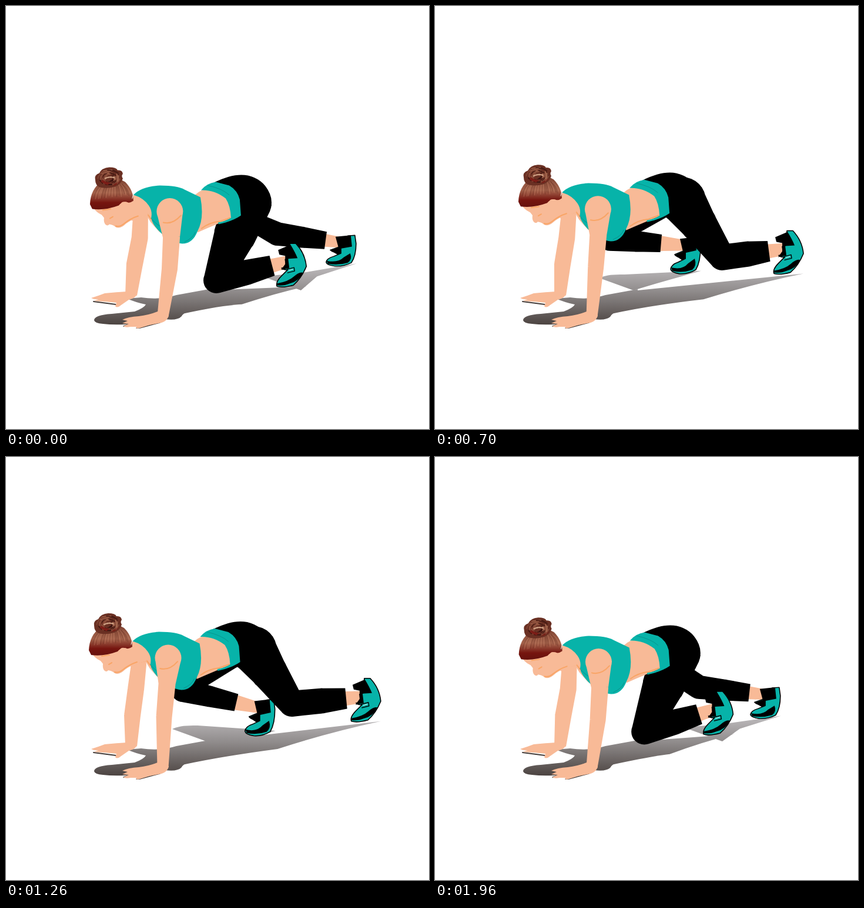
These frames come from a looping animation (720x720 px, 2100 ms). An HTML page:

```html
<!DOCTYPE html>
<html lang="en">
<head>
<meta charset="utf-8">
<title>Mountain climber exercise</title>
<style>
html, body { margin: 0; width: 100%; height: 100%; overflow: hidden; background: #fff; }
svg { display: block; width: 100vw; height: 100vh; }
.skin { fill: #f8ba97; }
.teal { fill: #07b3a9; }
.line { fill: none; stroke-linecap: round; stroke-linejoin: round; }
.warm { stroke: #f9a566; stroke-width: 2; }
.shoe { fill: #07b3a9; stroke: #000; stroke-width: 1.6; stroke-linejoin: round; }
</style>
</head>
<body>
<svg viewBox="0 0 720 720">
  <defs>
    <linearGradient id="ground" gradientUnits="userSpaceOnUse" x1="0" y1="440" x2="0" y2="542">
      <stop offset="0" stop-color="#bfbcbe"/>
      <stop offset=".45" stop-color="#8f8b8b"/>
      <stop offset="1" stop-color="#4c4441"/>
    </linearGradient>
    <linearGradient id="hair" gradientUnits="userSpaceOnUse" x1="0" y1="294" x2="0" y2="348">
      <stop offset="0" stop-color="#7a4030"/>
      <stop offset=".45" stop-color="#a8664e"/>
      <stop offset=".62" stop-color="#8a3a2c"/>
      <stop offset=".76" stop-color="#76150f"/>
      <stop offset="1" stop-color="#64110d"/>
    </linearGradient>
  </defs>

  <g fill="url(#ground)">
    <path d="M150 535Q150 526 180 524L219 520Q235 514 238 508Q222 505 206 498L230 496Q262 501 290 492L345 482V512L322 516Q302 521 299 528Q292 536 270 533L225 540Q190 544 165 541Q151 540 150 535Z"/>
    <path id="shadeFar"/>
    <path id="shadeNear"/>
  </g>

  <path d="M149 503L187 508" class="line" stroke="#443c39" stroke-width="2"/>
  <path id="armFar" class="skin"/>
  <path class="skin" d="M145 497Q158 493 168 489Q188 487 206 486L223 489Q222 497 209 500L196 509Q189 515 186 511L188 505Q170 503 150 502L158 499Q150 500 145 497Z"/>

  <path id="ankleFar" class="skin"/>
  <g id="shoeFar">
    <path class="shoe" d="M432 404L444 403L446 420Q446 445 438 459Q425 467 410 466Q396 464 395 458Q396 450 408 446L420 440Q405 438 402 433L414 428L420 425Z"/>
    <path d="M411 406L437 403L439 426L421 430L421 440L415 443L402 434L416 428Z"/>
    <path d="M396 455Q415 460 425 448L436 440Q440 452 432 459Q415 465 398 461Z"/>
  </g>
  <path id="legFar"/>

  <path id="ankleNear" class="skin"/>
  <g id="shoeNear">
    <path class="shoe" d="M488 405L498 405Q514 422 516 444Q508 464 494 476Q476 481 466 478Q463 471 474 460L484 450Q476 450 474 447L482 446L480 432L486 430Z"/>
    <path d="M468 416L489 407Q497 420 501 430L485 431L487 447L473 450L480 440L480 426L470 424Z"/>
    <path d="M466 473Q485 470 495 461Q505 452 511 455Q502 470 488 473Q476 478 466 476Z"/>
    <path d="M483 449L495 446L496 452L484 455" class="line" stroke="#000" stroke-width="1.4"/>
    <path d="M486 451L493 449" class="line" stroke="#e8f4f3"/>
  </g>
  <path id="legNear"/>

  <g id="trunk">
    <path d="M354 301Q388 284 412 289Q437 295 447 316L452 340L440 362L400 362L390 330Z"/>
    <path class="skin" d="M322 322Q334 310 348 313L378 328L386 361Q360 371 326 386Z"/>
    <path class="line warm" d="M333 379Q346 369 364 367L381 361"/>
    <path class="teal" d="M332 314Q342 302 357 300L380 306Q394 314 398 330L400 357Q390 364 374 369L362 372L361 369Q374 367 383 361Q382 340 374 328Q355 313 332 314Z"/>
    <path class="line" stroke="#07968f" d="M344 306Q368 311 380 322"/>
  </g>

  <g id="chest">
    <path class="skin" d="M212 336L218 322Q245 318 262 345L262 386L246 368L240 358L214 366Z"/>
    <path class="teal" d="M217 322Q230 308 262 306Q292 306 304 313L331 326Q338 362 326 384Q318 405 300 405Q285 404 265 388Q250 374 247 362Q250 350 243 340Q234 327 217 322Z"/>
    <path class="line warm" d="M228 358Q236 356 241 355L248 364"/>
    <path class="line" stroke="#09918b" d="M247 362Q256 372 262 375M304 402Q318 396 322 386"/>
  </g>

  <g id="head">
    <path class="skin" d="M146 338Q150 350 163 356L167 361Q166 368 169 372Q173 376 176 372Q183 373 187 377Q193 380 201 374Q209 366 224 361L242 356L232 335L216 322Z"/>
    <path class="line warm" d="M177 362L182 359M187 375Q194 377 201 371Q212 362 225 358M165 348L178 346"/>
    <path fill="url(#hair)" d="M143 338Q144 312 163 299Q185 289 203 300Q217 314 217 332Q210 337 205 334Q196 334 192 340Q168 349 147 346Z"/>
    <g id="strands" class="line"></g>
    <path class="line" stroke="#f8ba97" stroke-width="2.4" d="M196 341Q196 334 203 335Q211 336 208 343"/>
    <path fill="#6a3023" d="M152 296Q150 288 159 285Q163 276 176 275Q188 275 190 280Q198 279 199 286Q196 290 199 294Q196 304 186 308Q172 312 160 309Q152 306 152 296Z"/>
    <g id="bun" class="line"></g>
    <path class="line" stroke="#d0a184" stroke-width="2.4" stroke-dasharray="2.5 2" d="M169 294Q177 290 185 293"/>
    <path class="line" stroke="#eee" d="M217 320L215 328"/>
  </g>

  <path d="M200 545L208 542M222 548L228 548L262 539" class="line" stroke="#443c39" stroke-width="1.4"/>
  <path id="armNear" class="skin"/>
  <path class="skin" d="M198 534Q208 529 226 528Q244 526 258 520L277 526Q276 535 265 539L244 543L228 548Q220 550 222 546L212 546Q203 548 200 545L209 541L198 540L207 536Z"/>
  <path id="crease" class="line warm" d="M268 369Q284 373 298 357"/>
</svg>
<script>
const CYCLE = 15, STEP = 140;
const $ = id => document.getElementById(id);

// Joints at key steps: near knee, near cuff, far knee, far cuff
const poses = [
  [0, 358, 467, 453, 442, 462, 388, 544, 399],
  [2, 399, 475, 488, 440, 388, 409, 487, 402],
  [4, 455, 459, 541, 427, 305, 404, 404, 399],
  [6, 511, 402, 587, 410, 301, 391, 378, 410],
  [9, 486, 420, 579, 411, 301, 397, 392, 418],
  [11, 382, 466, 468, 421, 362, 412, 468, 412]
];

// Cyclic cubic spline through the key steps
function joints(f) {
  const n = poses.length;
  const key = j => poses[(j + n) % n].map((v, k) => k ? v : v + CYCLE * Math.floor(j / n));
  let i = n - 1;
  while (poses[i][0] > f) i--;
  const [a, b, c, d] = [i - 1, i, i + 1, i + 2].map(key);
  const h = c[0] - b[0], s = (f - b[0]) / h, r = 1 - s;
  const v = b.map((p, k) => {
    const m1 = (c[k] - a[k]) / (c[0] - a[0]) * h, m2 = (d[k] - p) / (d[0] - b[0]) * h;
    return (1 + 2 * s) * r * r * p + s * r * r * m1 + s * s * (3 - 2 * s) * c[k] - s * s * r * m2;
  });
  return [1, 3, 5, 7].map(k => [v[k], v[k + 1]]);
}

const lerp = (a, b, t) => a.map((v, i) => v + (b[i] - v) * t);
const dist = (a, b) => Math.hypot(b[0] - a[0], b[1] - a[1]);
const beyond = (a, b, len) => lerp(a, b, 1 + len / dist(a, b));
const disc = ([x, y], r) => `M${x - r} ${y}a${r} ${r} 0 1 1 ${2 * r} 0a${r} ${r} 0 1 1 ${-2 * r} 0Z`;

// Tapered limb through [point, radius] pairs, cut flat at the last one
function limb(...parts) {
  let d = "";
  for (let i = 1; i < parts.length; i++) {
    const [a, ra] = parts[i - 1], [b, rb] = parts[i], l = dist(a, b);
    const nx = (b[1] - a[1]) / l, ny = (a[0] - b[0]) / l;
    const side = (p, r) => `${p[0] + nx * r} ${p[1] + ny * r}`;
    d += disc(a, ra) + `M${side(a, ra)}L${side(b, rb)}L${side(b, -rb)}L${side(a, -ra)}Z`;
  }
  return d;
}

const draw = (id, d) => $(id).setAttribute("d", d);
const move = (id, x, y, s = 1) => $(id).setAttribute("transform", `translate(${x} ${y}) scale(1 ${s})`);

function legs(f, u) {
  const [knee, cuff, knee2, cuff2] = joints(f);

  const hip = [412 + (knee[0] - 358) * .07, 335 - 7 * u];
  draw("legNear", limb([hip, 40], [lerp(hip, knee, .4), 36 - (knee[0] - 360) * .035], [knee, 22]) +
    limb([knee, 22], [lerp(knee, cuff, .55), 21.5], [cuff, 17.5]));
  const ankle = beyond(knee, cuff, 23);
  draw("ankleNear", limb([cuff, 12], [beyond(knee, cuff, 30), 10]));
  move("shoeNear", ankle[0] - 480, ankle[1] - 437);

  const hip2 = [385, 350 - 5 * u];
  const thick = 15 + Math.max(0, 94 - dist(hip2, knee2)) * .3;
  draw("legFar", limb([hip2, thick], [lerp(hip2, knee2, .6), thick], [knee2, 20]) +
    limb([knee2, 20], [lerp(knee2, cuff2, .5), 18], [cuff2, 15]));
  // The far shin and foot shrink as they reach back
  const back = cuff2[0] - 378, size = 1 - back * .001, len = 38 - back * .096;
  const ankle2 = beyond(knee2, cuff2, len);
  draw("ankleFar", limb([cuff2, 13 * size], [beyond(knee2, cuff2, len + 4), 9]));
  move("shoeFar", ankle2[0] - 416, ankle2[1] - 417 * size, size);

  // Shadows follow the toes and the far knee
  const tx = ankle[0] + 36, ty = ankle[1] + 41;
  const mx = 300 + (tx - 300) * .48, my = 507 - (475 - ty) * .4;
  draw("shadeNear", `M300 492L345 484L${tx} ${ty}Q${(tx + mx) / 2} ${ty + (my - ty) * .4} ${mx} ${my}Q370 509 300 524Z`);
  const k = knee2[0], ex = ankle2[0] + 31, ey = Math.min(466, ankle2[1] + 47 * size - 3);
  draw("shadeFar", `M${k - 18} 463Q${k - 5} 456 ${k + 25} 457L${ex} ${ey}L${(k + ex) / 2} ${ey + 22}L${k + 40} 484Z`);
}

function render(f) {
  const u = .5 + .5 * Math.cos(2 * Math.PI * (f - 8.6) / CYCLE);
  legs(f, u);
  draw("armNear", limb([[279 - 3 * u, 350 - 8 * u], 22.5], [[282 - 8 * u, 394 - 8 * u], 14.5],
    [[279 - 10 * u, 448 - 6 * u], 13.5], [[267, 528], 9.5]));
  draw("armFar", limb([[229 - 3 * u, 362 - 9 * u], 13], [[228 - 7 * u, 395], 14],
    [[219 - 4 * u, 440], 14], [[213, 492], 10]));
  move("trunk", -1.5 * u, -8 * u);
  move("chest", -1.5 * u, -8.5 * u);
  move("head", -2 * u, -9 * u);
  move("crease", -6 * u, -9 * u);
}

let seed = 7;
const rand = () => (seed = seed * 16807 % 2147483647) / 2147483647;
const pick = list => list[Math.floor(rand() * list.length)];

let hair = "", curls = "";
for (let i = 0; i < 26; i++) {
  const x = 147 + i * 2.6, top = 163 + i * 1.5, y = 326 - i * .3 + rand() * 5;
  hair += `<path d="M${top} 304Q${x * .8 + top * .2} 311 ${x} ${y}" stroke="${pick(["#6a3325", "#bd7d62", "#8a4d3a"])}" opacity=".55"/>`;
}
for (let i = 0; i < 46; i++) {
  const a = rand() * 6.28, q = .3 + rand() * .6, turn = .5 + rand() * .6;
  const at = t => `${175.5 + Math.cos(t) * q * 22} ${293 + Math.sin(t) * q * 16}`;
  const color = pick(Math.sin(a) < .1 ? ["#a2644c", "#8a4d3a", "#4a1d15"] : ["#3a1410", "#7c1d17", "#8a4d3a"]);
  curls += `<path d="M${at(a)}Q${at(a + turn / 2)} ${at(a + turn)}" stroke="${color}" stroke-width="${1 + rand() * 1.5}"/>`;
}
$("strands").innerHTML = hair;
$("bun").innerHTML = curls;

let shown = -1;
function tick() {
  const f = Math.floor(performance.now() / STEP) % CYCLE;
  if (f !== shown) render(shown = f);
  requestAnimationFrame(tick);
}
tick();
</script>
</body>
</html>
```
